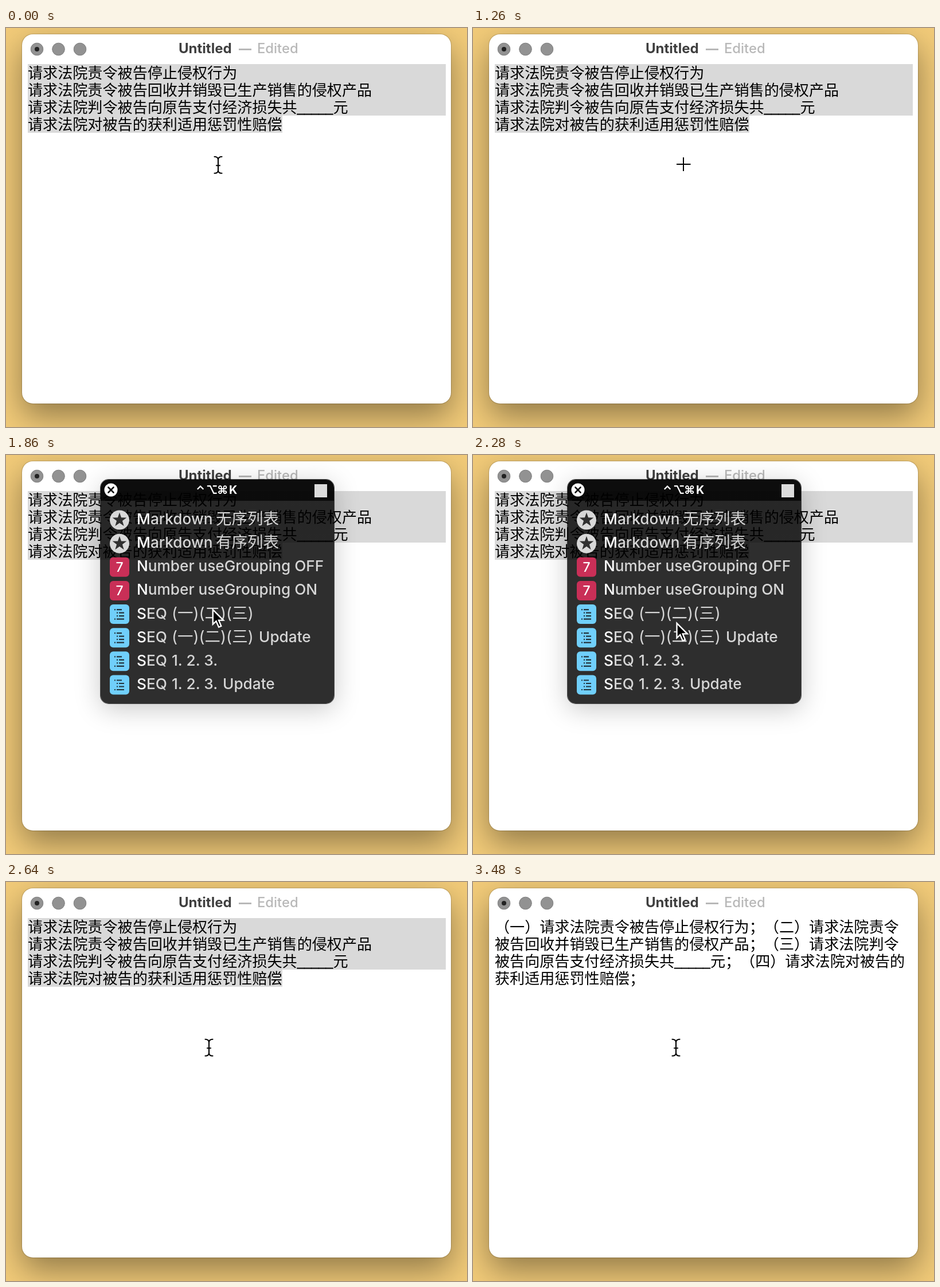
An HTML page for the animation above (3660 ms loop, 804x697 px).

```html
<!DOCTYPE html>
<html lang="zh-CN">
<head>
<meta charset="utf-8">
<title>Untitled</title>
<style>
html, body { margin: 0; width: 100%; height: 100%; overflow: hidden; background: #f2cb79; }
div, svg { position: absolute; }
svg { left: 0; top: 0; }
.window { left: 28px; top: 11px; width: 748px; height: 645px; border-radius: 19px; background: #fff;
  box-shadow: 0 0 1px 1px rgba(0,0,0,.16), 0 22px 56px rgba(0,0,0,.4); }
.panel, .halo { left: 165px; top: 43px; width: 407px; height: 391px; border-radius: 14px; }
.panel { background: linear-gradient(rgba(0,0,0,.95) 37px, rgba(0,0,0,.82) 37px); }
.halo { box-shadow: 0 0 0 1px rgba(0,0,0,.65), 0 9px 46px rgba(0,0,0,.22); }
text { font-family: Inter, "Noto Sans CJK SC", "Noto Sans CJK", "DejaVu Sans", sans-serif; white-space: pre; }
.doc { font: 26.1px "Noto Sans CJK SC", "Noto Sans CJK", sans-serif; }
.blank { font: 22.5px "Liberation Sans", sans-serif; stroke: #000; stroke-width: .5px; }
.item { font-size: 26.2px; font-weight: 450; fill: #d6d6d6; }
.cjk { font-size: 27.5px; font-weight: 400; }
.first { fill: #fff; font-weight: 500; }
.keys { font-size: 20px; font-weight: 700; fill: #fff; }
</style>
</head>
<body>
<div class="window"></div>
<svg width="804" height="697">
  <g fill="#929292" stroke="#7e7e7e">
    <circle cx="54" cy="37" r="10.8"/><circle cx="91.5" cy="37" r="10.8"/><circle cx="129" cy="37" r="10.8"/>
  </g>
  <circle cx="54" cy="37" r="4" fill="#222"/>
  <text x="301" y="44" font-size="24" font-weight="700" fill="#3e3e3e">Untitled</text>
  <rect x="406" y="36" width="22" height="2.8" fill="#b4b4b4"/>
  <text x="438" y="44" font-size="23.8" font-weight="450" fill="#b8b8b8">Edited</text>
  <g id="before"><path d="M38 63H767V153H482V183H38Z" fill="#d9d9d9"/></g>
  <g id="after"></g>
  <rect id="caret" x="298.5" y="153" width="2" height="29"/>
</svg>
<section id="menu">
  <div class="halo"></div>
  <div class="panel"></div>
  <svg id="list" width="804" height="697">
    <circle cx="183" cy="61" r="11.5" fill="#fff"/>
    <path d="M178.5 56.5l9 9m0-9l-9 9" stroke="#111" stroke-width="2.6" stroke-linecap="round"/>
    <text class="keys" x="331 349 368 389" y="68">⌃⌥⌘K</text>
    <rect x="538" y="51" width="22" height="23" fill="#dcdcdc"/>
  </svg>
</section>
<svg width="804" height="697">
  <g id="beam" fill="none" stroke-linecap="round">
    <path id="stem" stroke="#fff" stroke-width="4.6"
      d="M-6.5-14.2Q0-14.2 0-8.5Q0-14.2 6.5-14.2M0-8.5V9.5M-6.5 14.8Q0 14.8 0 9.5Q0 14.8 6.5 14.8M-3 1.2H3"/>
  </g>
  <path id="cross" d="M-12 0H12.5M0-12V12" stroke="#000" stroke-width="2"/>
  <path id="arrow" d="M0 0V25.5L5.8 20L10.3 30.5L14.5 28.7L10.2 18.4H18.3Z" stroke="#fff" stroke-width="2.4"/>
</svg>
<script>
const $ = id => document.getElementById(id);
const NS = "http://www.w3.org/2000/svg";

function add(parent, tag, attrs, text = "") {
  const el = document.createElementNS(NS, tag);
  for (const k in attrs) el.setAttribute(k, attrs[k]);
  el.textContent = text;
  parent.append(el);
  return el;
}

// "_" marks the blank; a separate "；" keeps its full width before a bracket.
function addLines(group, lines) {
  lines.forEach((line, i) => {
    const y = 88 + 30 * i;
    let x = 38;
    for (const part of line.split(/([_；])/)) {
      const blank = part === "_";
      add(group, "text", { class: blank ? "blank" : "doc", x, y: blank ? y - 1 : y }, blank ? "_____" : part);
      x += blank ? 62.7 : 26.1 * part.length;
    }
  });
}
addLines($("before"), [
  "请求法院责令被告停止侵权行为",
  "请求法院责令被告回收并销毁已生产销售的侵权产品",
  "请求法院判令被告向原告支付经济损失共_元",
  "请求法院对被告的获利适用惩罚性赔偿"
]);
addLines($("after"), [
  "（一）请求法院责令被告停止侵权行为；（二）请求法院责令",
  "被告回收并销毁已生产销售的侵权产品；（三）请求法院判令",
  "被告向原告支付经济损失共_元；（四）请求法院对被告的",
  "获利适用惩罚性赔偿；"
]);

const star = [...Array(10).keys()].map(i => {
  const r = i % 2 ? 5.2 : 13, a = i * Math.PI / 5;
  return [r * Math.sin(a), -r * Math.cos(a)].map(v => v.toFixed(2));
}).join(" ");

const icons = {
  star(g) {
    add(g, "circle", { r: 17, fill: "#d8d8d8" });
    add(g, "polygon", { points: star, fill: "#303030" });
  },
  seven(g) {
    add(g, "rect", { x: -17, y: -17, width: 34, height: 34, rx: 6, fill: "#c92f57" });
    add(g, "text", { y: 8.5, "text-anchor": "middle", "font-size": 23, "font-weight": 500, fill: "#fff" }, "7");
  },
  list(g) {
    add(g, "rect", { x: -17, y: -17, width: 34, height: 34, rx: 6, fill: "#70cffb" });
    add(g, "path", { d: "M-9-8h2m2 0h9M-5-2.5h2m2 0h9M-5 3h2m2 0h9M-9 8.5h2m2 0h13",
      stroke: "#23343d", "stroke-width": 2.2 });
  }
};

// Each row: icon, first word, then further parts as [x, text, class].
const nums = [289, "(一)(二)(三)", "cjk"], digits = [289, "1. 2. 3."];
[
  ["star", "Markdown", [366, "无序列表", "cjk"]],
  ["star", "Markdown", [366, "有序列表", "cjk"]],
  ["seven", "Number useGrouping OFF"],
  ["seven", "Number useGrouping ON"],
  ["list", "SEQ", nums],
  ["list", "SEQ", nums, [441, "Update"]],
  ["list", "SEQ", digits],
  ["list", "SEQ", digits, [378, "Update"]]
].forEach(([icon, word, ...parts], i) => {
  const y = 121 + 41.14 * i;
  icons[icon](add($("list"), "g", { transform: `translate(198 ${y - 7.5})` }));
  const label = add($("list"), "text", { class: "item", x: 228, y });
  add(label, "tspan", { class: "first" }, word[0]);
  add(label, "tspan", {}, word.slice(1));
  for (const [x, text, cls = ""] of parts) add(label, "tspan", { x, class: cls }, text);
});
add($("beam"), "path", { d: $("stem").getAttribute("d"), stroke: "#000", "stroke-width": 2.1 });

const show = (id, on) => $(id).style.display = on ? "" : "none";
const ease = (t, a, b) => {
  const p = Math.min(1, Math.max(0, (t - a) / (b - a)));
  return p * p * (3 - 2 * p);
};

function pointer(t) {
  if (t < 1320) {
    const p = ease(t, 540, 1200);
    return [t < 1200 ? "beam" : "cross", 370 - 3 * p, 239 - p];
  }
  if (t < 2520) {
    const p = ease(t, 1320, 2280);
    return ["arrow", 368.5 - 13 * p, 235.5 + 58.5 * p - 3 * ease(t, 2280, 2460)];
  }
  return ["beam", 354, 289];
}

function draw(now) {
  const t = Math.floor(now % 3660 / 60) * 60;
  const done = t >= 3000;
  show("before", !done);
  show("after", done);
  show("caret", done && t < 3480);
  show("menu", t >= 1320 && t < 2640);
  const [kind, x, y] = pointer(t);
  for (const id of ["beam", "cross", "arrow"]) show(id, id === kind);
  $(kind).setAttribute("transform", `translate(${x} ${y})`);
}

const start = performance.now();
function tick() {
  draw(performance.now() - start);
  requestAnimationFrame(tick);
}
tick();
</script>
</body>
</html>
```
